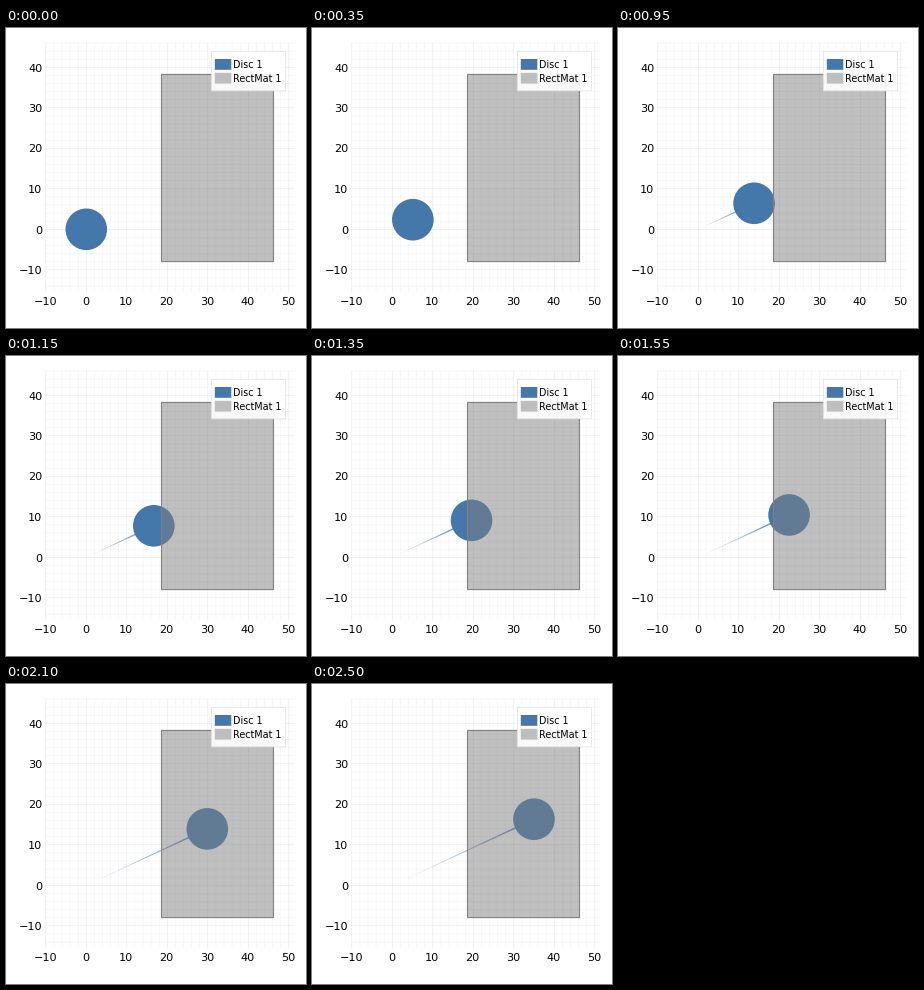
A matplotlib script that plays this animation: 300 px wide and 300 px high, repeating every 2.55 s.

```python
import math

import matplotlib.pyplot as plt
import numpy as np
from matplotlib.animation import FuncAnimation
from matplotlib.collections import LineCollection
from matplotlib.colors import to_rgba
from matplotlib.patches import Circle, Rectangle

SIZE, DPI = 300, 100
FRAMES, INTERVAL = 51, 50
X0, Y0, UNIT = 80.3, 201.3, 4.05          # data origin and scale in pixels
LEFT, RIGHT, TOP, BOTTOM = 39.5, 288, 15, 264
BLUE, GRAY = "#4477aa", "#808080"

RADIUS = 20.8
SPEED = 2.936                             # horizontal pixels per frame
DRAG = 0.0172                             # slowing on the mat, per frame squared
SLOPE = math.tan(math.radians(25))
TRAIL_WIDTH = 1.9
MAT_X, MAT_Y, MAT_W, MAT_H = 155.5, 46.4, 112, 187.2
ENTRY = (MAT_X - X0) / SPEED


def pt(px):
    return px * 72 / DPI


def to_x(v):
    return X0 + UNIT * v


def to_y(v):
    return Y0 - UNIT * v


fig = plt.figure(figsize=(SIZE / DPI, SIZE / DPI), dpi=DPI, facecolor="white")
ax = fig.add_axes([0, 0, 1, 1])
ax.set_xlim(0, SIZE)
ax.set_ylim(SIZE, 0)
ax.axis("off")


def label(x, y, text, size, ha):
    ax.text(x, y, text, fontsize=pt(size), family="DejaVu Sans",
            color="black", ha=ha, va="baseline", zorder=12)


def box(x, y, w, h, z, fill="none", edge="none", lw=0, alpha=None):
    ax.add_patch(Rectangle((x, y), w, h, fc=fill, ec=edge, lw=pt(lw),
                           alpha=alpha, zorder=z, snap=False))


def draw_grid():
    for v in range(-14, 52, 2):
        major = v % 10 == 0
        style = dict(color="black", lw=pt(0.55), zorder=1, snap=False,
                     alpha=0.1 if major else 0.05)
        if LEFT <= to_x(v) <= RIGHT:
            ax.plot([to_x(v)] * 2, [TOP, BOTTOM], **style)
        if TOP <= to_y(v) <= BOTTOM:
            ax.plot([LEFT, RIGHT], [to_y(v)] * 2, **style)


def draw_ticks():
    for v in range(-10, 60, 10):
        text = str(v).replace("-", "\u2212")
        label(to_x(v) - 0.5, 277, text, 11.2, "center")
        if v < 50:
            label(36.3, to_y(v) + 4.2, text, 11.2, "right")


def draw_mat():
    mat = MAT_X, MAT_Y, MAT_W, MAT_H
    box(*mat, 5, fill=GRAY, alpha=0.5)
    box(*mat, 6, edge=GRAY, lw=1.1)


def draw_legend():
    frame = 205.5, 23.6, 74, 39.2
    box(*frame, 8, fill="white", alpha=0.9)
    box(*frame, 9, edge="#e4e4e4", lw=0.8)
    for text, color, y in [("Disc 1", BLUE, 31), ("RectMat 1", "#bebebe", 44.8)]:
        box(208.8, y, 16.5, 10.8, 10, fill=color)
        label(227, y + 9.2, text, 9.7, "left")


draw_grid()
draw_ticks()
draw_mat()
draw_legend()

trail = ax.add_collection(LineCollection([], zorder=3), autolim=False)
disc = ax.add_patch(Circle((X0, Y0), RADIUS, fc=BLUE, ec="none", zorder=4))


def position(i):
    """Steady straight travel, slowed once the disc is on the mat."""
    dx = SPEED * i - DRAG / 2 * np.maximum(0, i - ENTRY) ** 2
    return X0 + dx, Y0 - SLOPE * dx


def update(i):
    disc.center = position(i)
    points = np.column_stack(position(np.arange(i + 1)))
    trail.set_segments(list(zip(points[:-1], points[1:])))
    # The trail grows wider and more opaque towards the disc.
    ramp = np.linspace(0, 1, i + 1)[1:]
    trail.set_linewidths(pt(TRAIL_WIDTH) * ramp)
    trail.set_color([to_rgba(BLUE, a) for a in ramp])
    return trail, disc


anim = FuncAnimation(fig, update, frames=FRAMES, interval=INTERVAL,
                     repeat=True, repeat_delay=0, blit=False)
plt.show()
```
